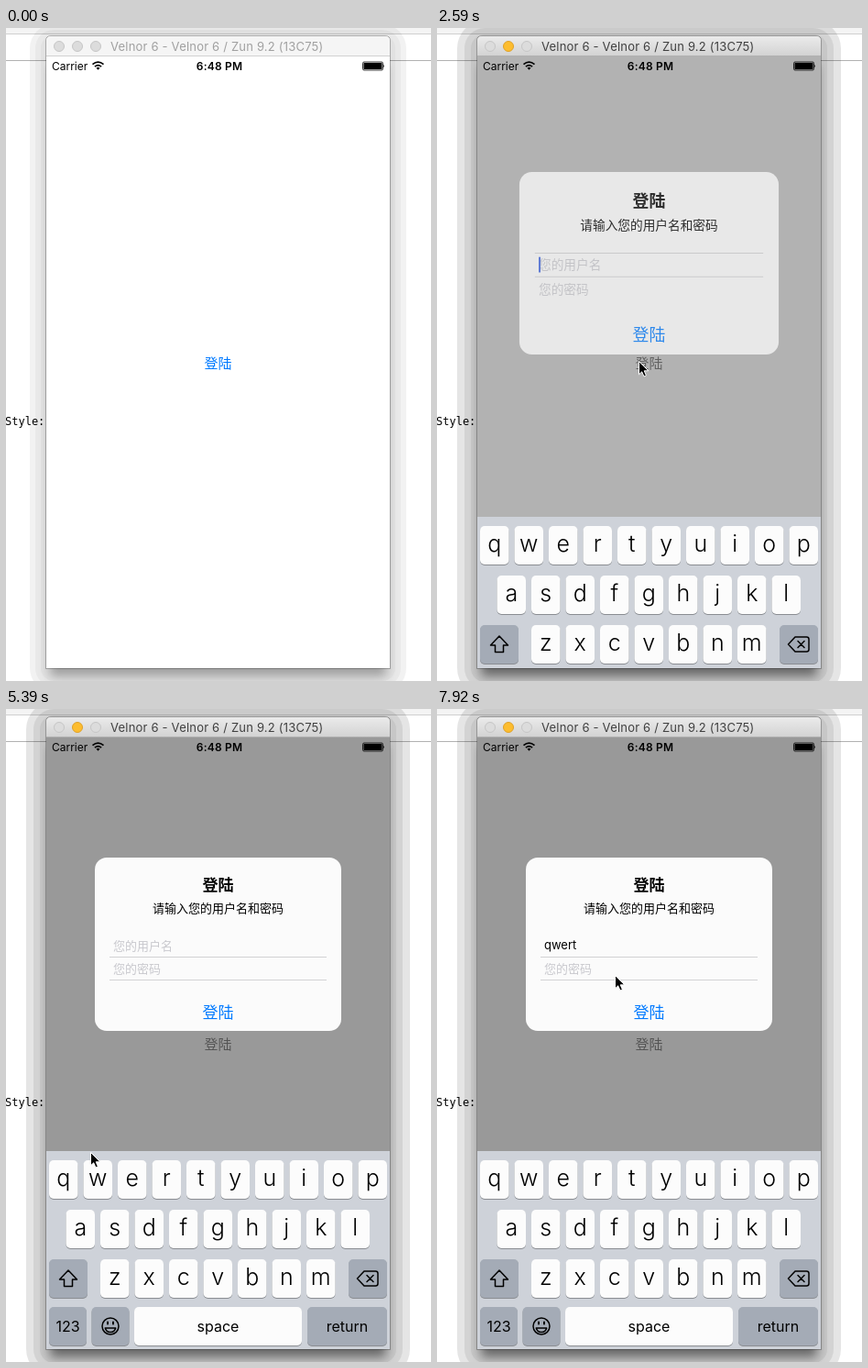
Animation of 464 by 712 pixels, one loop 8 s. Source, as an HTML page:

```html
<!DOCTYPE html>
<html lang="en">
<head>
<meta charset="utf-8">
<title>Login alert</title>
<style>
  html, body { margin: 0; width: 100%; height: 100%; overflow: hidden; background: #fff; }
  svg { display: block; width: 464px; height: 712px; }
  text { font-family: Inter, "Noto Sans CJK SC", "Noto Sans CJK", sans-serif; white-space: pre; }
  .mid { text-anchor: middle; }
  .letter { font-size: 25px; font-weight: 300; }
  .line { fill: #d2d2d4; }
  .hint { fill: #c9c9ce; }
  .icon { fill: none; stroke: #000; stroke-width: 1.5; stroke-linejoin: round; stroke-linecap: round; }
</style>
</head>
<body>
<svg viewBox="0 0 464 712">
  <defs>
    <filter id="blur" x="-20%" y="-20%" width="140%" height="140%"><feGaussianBlur stdDeviation="6"/></filter>
    <filter id="lift" x="-20%" y="-20%" width="140%" height="140%">
      <feDropShadow dx="0" dy="1" stdDeviation="1.5" flood-opacity=".3"/>
    </filter>
    <linearGradient id="bar" x2="0" y2="1">
      <stop stop-color="#ebebeb"/><stop offset="1" stop-color="#d3d3d3"/>
    </linearGradient>
    <clipPath id="screen"><path d="M44 31H419V698H44Z"/></clipPath>
  </defs>

  <path fill="#f4f4f4" d="M0 0H464V6H0Z"/>
  <path fill="#cfcfcf" d="M0 6H464V7H0Z"/>
  <path fill="#b2b2b2" d="M0 35H464V36H0Z"/>
  <text x="-1" y="433" font-size="12" style="font-family:'DejaVu Sans Mono',monospace">Style:</text>
  <g id="shade"></g>

  <path fill="#fff" d="M44 30H419V698H44Z"/>
  <path id="titlebar" d="M44 30V14Q44 9 49 9H414Q419 9 419 14V30Z"/>
  <path id="barEdge" d="M44 30H419V31H44Z"/>
  <g id="lights"></g>
  <text id="title" x="114" y="25" font-size="13" letter-spacing=".2">Velnor 6 - Velnor 6 / Zun 9.2 (13C75)</text>

  <g clip-path="url(#screen)">
    <text id="login" class="mid" x="231.5" y="370.5" font-size="15">登陆</text>
    <path id="dim" d="M44 31H419V698H44Z"/>
    <text x="50" y="45.5" font-size="12">Carrier</text>
    <text class="mid" x="233" y="45.5" font-size="12" font-weight="600" letter-spacing=".2">6:48 PM</text>
    <g fill="none" stroke="#000" stroke-width="1.7">
      <path d="M94.5 39.7Q100.500 34.500 106.500 39.700M96.900 42.200Q100.500 39.100 104.100 42.200"/>
      <path d="M98.500 43.600Q100.500 42 102.500 43.600L100.500 45.800Z" fill="#000" stroke="none"/>
    </g>
    <rect x="389.500" y="37" width="22" height="9" rx="1.500" fill="none" stroke="#000" stroke-width=".8"/>
    <rect x="390.500" y="38" width="20" height="7" rx=".5"/>
    <path d="M412.300 39.800Q414 41.500 412.300 43.200Z"/>

    <g id="alert">
      <rect x="97" y="162" width="269" height="189" rx="13" fill="#fbfbfb"/>
      <text class="mid" x="231.5" y="198" font-size="17" font-weight="700">登陆</text>
      <text class="mid" x="231.5" y="222" font-size="13">请输入您的用户名和密码</text>
      <path id="topLine" class="line" d="M113 245.500H350V246.500H113Z"/>
      <path class="line" d="M113 270H350V271H113Z"/>
      <path id="lowLine" class="line" d="M113 295H350V296H113Z"/>
      <text id="hint" class="hint" x="117" y="263" font-size="13">您的用户名</text>
      <text class="hint" x="117" y="288" font-size="13">您的密码</text>
      <text id="name" x="117" y="262" font-size="13"></text>
      <rect id="caret" y="250" width="2" height="16" fill="#456be0"/>
      <text class="mid" x="231.5" y="336.5" font-size="17" fill="#007aff">登陆</text>
    </g>

    <g id="board">
      <path fill="#ced2d9" d="M44 482H419V698H44Z"/>
      <g id="keys"></g>
      <path class="icon" d="M68 612L77.500 622H72.500V629.500H63.500V622H58.500Z"/>
      <path class="icon" d="M383.500 621L391 613H403.500Q406 613 406 615.500V626.500Q406 629 403.500 629H391ZM394 617.500L401 624.500M401 617.500L394 624.500"/>
      <g class="icon">
        <circle cx="114" cy="673" r="9"/>
        <path d="M108.300 675H119.700Q118.500 679.500 114 679.500T108.300 675Z"/>
        <path d="M111 668.500V670.500M117 668.500V670.500" stroke-width="2"/>
      </g>
    </g>
    <g id="popup">
      <path id="bubble" fill="#fcfcfc" filter="url(#lift)"/>
      <text id="bigLetter" class="mid" y="469" font-size="38" font-weight="300"></text>
    </g>
  </g>

  <path id="arrow" stroke="#fff" stroke-width="1" d="M.5 .5V14.800L3.700 11.800 6 17 8.400 15.900 6.200 10.800H10.800Z"/>
  <path id="beam" fill="none" stroke="#000" d="M1 .5Q3.500 .5 4 2Q4.500 .5 7 .5M4 2V12M1 13.500Q3.500 13.500 4 12Q4.500 13.500 7 13.500M2.500 9.500H5.500"/>
</svg>
<script>
const LOOP = 8000;
const $ = id => document.getElementById(id);

function add(parent, tag, attrs, text) {
  const el = document.createElementNS("http://www.w3.org/2000/svg", tag);
  for (const k in attrs) el.setAttribute(k, attrs[k]);
  if (text) el.textContent = text;
  return parent.appendChild(el);
}

// Window shadow: nested translucent bands, wider when the window is active
function makeShade(pads, alphas, depth) {
  const g = add($("shade"), "g", {});
  pads.forEach((p, i) => add(g, "rect", {
    x: 44 - p, y: 14 - p, width: 375 + 2 * p, height: 692 + 2 * p,
    rx: p + 8, "fill-opacity": alphas[i]
  }));
  add(g, "rect", { x: 48, y: 40, width: 367, height: 667, "fill-opacity": depth, filter: "url(#blur)" });
  add(g, "path", { d: "M43.500 698.500V14Q43.500 8.500 49 8.500H414Q419.500 8.500 419.500 14V698.500Z", fill: "none", stroke: "#000", "stroke-opacity": .25 });
  return g;
}
const calmShade = makeShade([18, 12, 6], [.05, .04, .03], .3);
const activeShade = makeShade([22, 14, 7], [.1, .08, .06], .48);

const lights = [58, 78, 98].map(cx =>
  add($("lights"), "circle", { cx, cy: 20, r: 5.5, fill: "#dcdcdc", stroke: "#c6c6c6" }));

function addKey(x, y, w, label, dark, size) {
  add($("keys"), "rect", { x, y: y + 1, width: w, height: 42, rx: 5, fill: "#8a8d92" });
  add($("keys"), "rect", { x, y, width: w, height: 42, rx: 5, fill: dark ? "#a4abb6" : "#fcfcfc" });
  if (!label) return;
  add($("keys"), "text", size
    ? { x: x + w / 2, y: y + 26.5, class: "mid", "font-size": size }
    : { x: x + w / 2, y: y + 28, class: "mid letter" }, label);
}
const keyX = {};
[["qwertyuiop", 47, 492], ["asdfghjkl", 65.5, 546], ["zxcvbnm", 103, 600]].forEach(([row, x0, y]) =>
  [...row].forEach((c, i) => addKey(keyX[c] = x0 + i * 37.5, y, 31.5, c)));
addKey(47, 600, 42, "", true);
addKey(374, 600, 42, "", true);
addKey(47, 652, 41, "123", true, 16);
addKey(93.5, 652, 41, "", true);
addKey(140, 652, 183, "space", false, 16);
addKey(329, 652, 87, "return", true, 16);

function bubblePath(key) {
  const a = keyX[key], b = a + 31.5;
  const l = key === "q" ? a : a - 13, r = l + 58;
  return `M${l} 436Q${l} 427 ${l + 9} 427H${r - 9}Q${r} 427 ${r} 436V472` +
    `C${r} 484 ${b} 484 ${b} 497V529Q${b} 534 ${b - 5} 534H${a + 5}Q${a} 534 ${a} 529V497` +
    `C${a} 484 ${l} 484 ${l} 472Z`;
}

// Tables of [start time, values...]; each value holds until the next row
const pointer = [
  [0], [500, 0, 552, "beam"], [650], [1250, 4, 505, "beam"],
  [1400, 110, 440], [1540, 190, 385], [1690, 220, 365], [1990, 220, 363],
  [2880, 218, 350], [3030, 208, 318], [3180, 192, 280], [3330, 179, 252],
  [3480, 173, 242], [3620, 172, 244], [3770, 171, 246], [4060, 170, 247],
  [4510, 171, 247], [4660, 170, 249], [5100, 150, 320], [5240, 112, 430],
  [5390, 92, 483], [5540, 72, 500], [5690, 61, 508], [5840, 70, 510],
  [5990, 87, 510], [6140, 97, 510], [6280, 118, 509], [6430, 135, 508],
  [6580, 156, 508], [6730, 172, 508], [6870, 194, 507], [7020, 210, 507],
  [7170, 215, 507], [7320, 228, 505], [7470, 235, 470], [7620, 230, 400],
  [7770, 211, 335], [7920, 194, 290]
];
const present = [[0, 0], [2440, .25], [2590, .75], [2730, .95], [2880, 1]];
const blink = [
  [0, 1], [3180, .5], [3330, .06], [3620, .5], [3770, 1], [4060, .5], [4210, 0],
  [4510, .5], [4660, 1], [5100, .5], [5240, 0], [5840, 1], [7470, .5], [7620, 0]
];
const presses = [["q", 5690, 5840], ["w", 6140, 6280], ["e", 6430, 6580], ["r", 6730, 6870], ["t", 7020, 7170]];

const at = (table, t) => table.findLast(row => row[0] <= t);
const show = (el, on) => { el.style.display = on ? "" : "none"; };

function draw(t) {
  const active = t >= 1990;
  show(calmShade, !active);
  show(activeShade, active);
  $("titlebar").setAttribute("fill", active ? "url(#bar)" : "#f5f5f5");
  $("barEdge").setAttribute("fill", active ? "#b1b1b1" : "#d1d1d1");
  $("title").setAttribute("fill", active ? "#404040" : "#a0a0a0");
  lights[1].setAttribute("fill", active ? "#fdbd2f" : "#dcdcdc");
  lights[1].setAttribute("stroke", active ? "#dfa128" : "#c6c6c6");

  const p = at(present, t)[1];
  const pressed = t >= 2140 && t < 2290;
  $("login").setAttribute("fill", p ? "#8c8c8c" : "#007aff");
  $("login").setAttribute("opacity", pressed ? .3 : 1);
  $("dim").setAttribute("fill-opacity", .4 * p);
  $("alert").setAttribute("opacity", p);
  const s = 1 + .21 * (1 - p);
  $("alert").setAttribute("transform", `translate(231.5 256.5) scale(${s}) translate(-231.5 -256.5)`);
  show($("topLine"), p < 1);
  show($("lowLine"), p === 1);
  $("board").setAttribute("transform", `translate(0 ${Math.round(205 * (1 - p))})`);
  show($("board"), p > 0);

  const typed = presses.filter(k => t >= k[2]).map(k => k[0]).join("");
  $("name").textContent = typed;
  show($("hint"), !typed);
  $("caret").setAttribute("x", 117 + (typed ? $("name").getComputedTextLength() - .5 : 0));
  $("caret").setAttribute("opacity", at(blink, t)[1]);

  const held = presses.find(k => t >= k[1] && t < k[2]);
  show($("popup"), held);
  if (held) {
    const key = held[0];
    $("bubble").setAttribute("d", bubblePath(key));
    $("bigLetter").textContent = key;
    $("bigLetter").setAttribute("x", key === "q" ? 76 : keyX[key] + 16);
  }

  const [, x, y, shape = "arrow"] = at(pointer, t);
  for (const id of ["arrow", "beam"]) {
    const on = x !== undefined && shape === id;
    show($(id), on);
    if (on) $(id).setAttribute("transform", `translate(${x} ${y})`);
  }
}

const start = performance.now();
function tick() {
  draw((performance.now() - start) % LOOP);
  requestAnimationFrame(tick);
}
tick();
</script>
</body>
</html>
```
